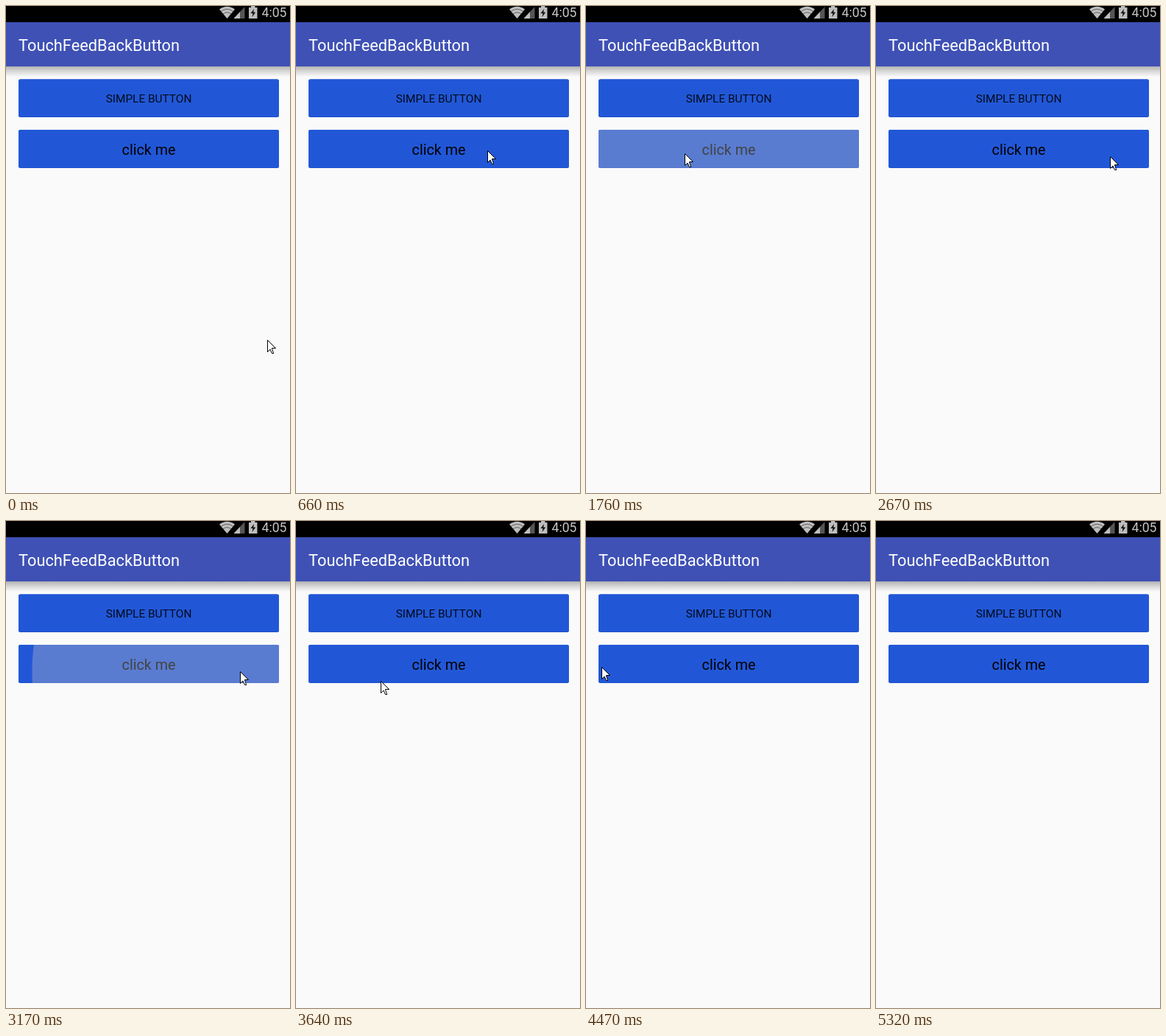
An HTML page that plays this animation: 386x661 px, repeating every 6560 ms.

```html
<!DOCTYPE html>
<html lang="en">
<head>
<meta charset="utf-8">
<title>Touch feedback button</title>
<style>
  html, body { margin: 0; width: 100%; height: 100%; overflow: hidden; background: #fafafa; }
  svg { display: block; }
  text { font-family: Roboto, "Noto Sans", sans-serif; }
  .button { fill: #2157d7; }
  .edge { fill: #1d50c8; }
  .label { text-anchor: middle; }
  .icon { fill: #bebebe; }
</style>
</head>
<body>
<svg width="386" height="661" viewBox="0 0 386 661">
  <defs>
    <linearGradient id="shadow" x2="0" y2="1">
      <stop offset="0" stop-color="#b2b2b2"/>
      <stop offset=".45" stop-color="#d6d6d6"/>
      <stop offset="1" stop-color="#fafafa"/>
    </linearGradient>
    <clipPath id="clip"><rect x="17" y="168" width="354" height="52" rx="2.5"/></clipPath>
  </defs>

  <rect width="386" height="661" fill="#fafafa"/>
  <rect y="82" width="386" height="14" fill="url(#shadow)"/>
  <rect y="22" width="386" height="60" fill="#3f51b5"/>
  <text x="17" y="60.6" font-size="21.8" fill="#fff">TouchFeedBackButton</text>

  <!-- status bar -->
  <rect width="386" height="22" fill="#000"/>
  <path class="icon" d="M290 4.5Q300.5 -3 311 4.5L300.5 17Z"/>
  <path d="M292 7.5Q300.5 1 309 7.5M295 10.8Q300.5 6.5 306 10.8" fill="none" stroke="#444" stroke-width=".8"/>
  <path d="M309.5 17L324.5 1V17Z" fill="#555"/>
  <path class="icon" d="M309.5 17L318 8V17Z"/>
  <path class="icon" d="M333 0H338.5V2H341.5V17H330V2H333Z"/>
  <path d="M337 4L332.5 10H335.500L334.500 15L339.300 8.500H336.300Z" fill="#111"/>
  <text x="347.5" y="15" font-size="17.6" fill="#c4c4c4">4:05</text>

  <rect class="edge" x="17" y="99.4" width="354" height="51.6" rx="2.5"/>
  <rect class="button" x="17" y="99.4" width="354" height="50.8" rx="2.5"/>
  <text class="label" x="194" y="131.3" font-size="15.4" fill-opacity=".87">SIMPLE BUTTON</text>

  <rect class="edge" x="17" y="168" width="354" height="52" rx="2.5"/>
  <rect class="button" x="17" y="168" width="354" height="51.2" rx="2.5"/>
  <text class="label" x="194" y="202" font-size="19.7">click me</text>
  <g clip-path="url(#clip)">
    <circle id="ripple" r="0" fill="#c4c4c4" fill-opacity=".34"/>
  </g>

  <path id="cursor" d="M.5 .5V16.5L4 13L6.500 18.500H8.700L6.500 12V11.500H11.500Z"
        fill="#fff" stroke="#000" stroke-linejoin="round"/>
</svg>
<script>
  const LOOP = 6560, RIPPLE_MS = 300, RIPPLE_RADIUS = 354;
  const PRESSES = [1550, 2960, 3890, 4700];
  const cursor = document.getElementById('cursor');
  const ripple = document.getElementById('ripple');

  // Each stroke follows one cubic curve; the pointer rests in between.
  const strokes = [
    { from: 80, to: 880, curve: [[355, 453], [310, 330], [262, 191], [232, 131]] },
    { from: 880, to: 1390, curve: [[232, 131], [222, 200], [191, 234], [134, 200]] },
    { from: 1850, to: 2670, curve: [[134, 200], [220, 200], [269, 272], [318, 204]] },
    { from: 3200, to: 3730, curve: [[318, 204], [320, 350], [98, 208], [98, 206]] },
    { from: 4110, to: 4470, curve: [[98, 206], [85, 236], [40, 232], [21, 198]] },
    { from: 5000, to: 5330, curve: [[21, 198], [330, 240], [345, 380], [351, 700]] }
  ];

  const mix = (a, b, u) => a.map((value, axis) => value + (b[axis] - value) * u);

  // De Casteljau: blend neighbours until one point is left.
  function pointOn(points, u) {
    while (points.length > 1) {
      points = points.slice(1).map((next, i) => mix(points[i], next, u));
    }
    return points[0];
  }

  function pointerAt(time) {
    const { from, to, curve } = strokes.findLast(stroke => stroke.from <= time) || strokes[0];
    const progress = (time - from) / (to - from);
    return pointOn(curve, Math.min(1, Math.max(0, progress)));
  }

  function draw(now) {
    const time = now % LOOP;
    const [x, y] = pointerAt(time).map(Math.round);
    cursor.setAttribute('transform', `translate(${x} ${y})`);

    const press = PRESSES.find(start => time >= start && time < start + RIPPLE_MS);
    const progress = press ? (time - press) / RIPPLE_MS : 0;
    const [cx, cy] = pointerAt(press || 0);
    ripple.setAttribute('cx', cx);
    ripple.setAttribute('cy', cy);
    ripple.setAttribute('r', RIPPLE_RADIUS * (1 - Math.cos(Math.PI * progress)) / 2);
  }

  const begin = performance.now();
  function tick() {
    draw(performance.now() - begin);
    requestAnimationFrame(tick);
  }
  tick();
</script>
</body>
</html>
```
